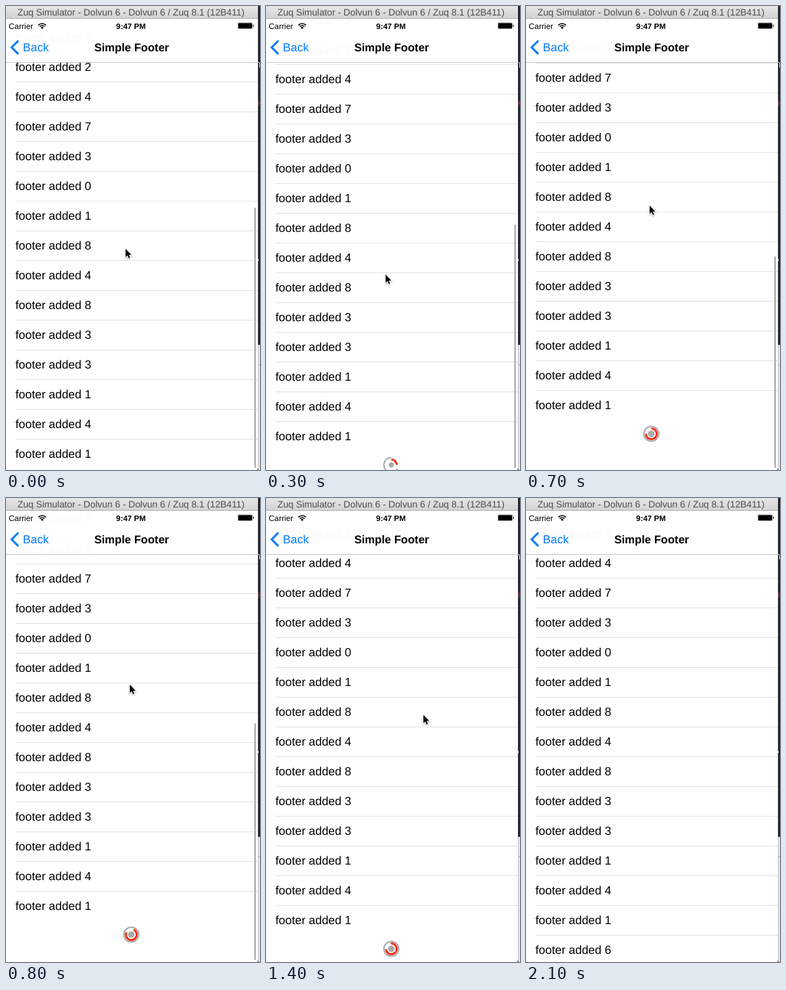
An HTML page with a canvas for the animation above (2.4 s loop, 376 by 686 pixels).

```html
<!DOCTYPE html>
<html lang="en">
<head>
<meta charset="utf-8">
<title>Simple Footer</title>
<style>
html, body { margin: 0; width: 100%; height: 100%; overflow: hidden; background: #fff; }
canvas { display: block; }
</style>
</head>
<body>
<canvas id="stage" width="376" height="686"></canvas>
<script>
const ctx = document.getElementById('stage').getContext('2d');
ctx.textRendering = 'geometricPrecision';
const SANS = '"Liberation Sans", Arial, sans-serif';
const W = 376, H = 686, EDGE = 373, ROW = 44, REST = 664;
const LOOP = 2400, STEP = 100, LAST_STEP = 21;
const ROWS = [3, 2, 4, 7, 3, 0, 1, 8, 4, 8, 3, 3, 1, 4, 1];
const BLUE = '#007aff', RED = '#f72c12', GRAY = '#a9a9a9', LINE = '#e2e2e2';

// keys: [step, value] pairs
const PULL = [[0, 2], [1, 0], [2, 3], [3, 28], [5, 50], [7, 74], [8, 61], [9, 45], [10, 40]];
const BAR_TOP = [[0, 298], [1, 296], [2, 299], [3, 323], [5, 346], [7, 370], [8, 333], [9, 317], [10, 311]];
const BAR_ALPHA = [[9, 1], [10, 0.65], [11, 0.25], [12, 0]];
const CURSOR_X = [[3, 177], [5, 179], [7, 183], [10, 184]];
const CURSOR_Y = [[0, 359], [1, 402], [2, 440], [3, 397], [5, 355], [7, 295], [8, 276], [10, 266]];

function at(keys, s) {
  if (s <= keys[0][0]) return keys[0][1];
  for (let i = 1; i < keys.length; i++) {
    const [s0, v0] = keys[i - 1], [s1, v1] = keys[i];
    if (s <= s1) return v0 + (v1 - v0) * (s - s0) / (s1 - s0);
  }
  return keys[keys.length - 1][1];
}

const clamp = v => Math.max(0, Math.min(1, v));

function rect(x, y, w, h, color) {
  ctx.fillStyle = color;
  ctx.fillRect(x, y, w, h);
}

function text(str, x, y, size, color, weight = 'normal', align = 'left') {
  ctx.font = `${weight} ${size}px ${SANS}`;
  ctx.textAlign = align;
  ctx.fillStyle = color;
  ctx.fillText(str, x, y);
}

function arc(x, y, r, from, to, width, color) {
  ctx.beginPath();
  ctx.arc(x, y, r, from * Math.PI / 180, to * Math.PI / 180);
  ctx.lineWidth = width;
  ctx.strokeStyle = color;
  ctx.stroke();
}

function dot(x, y, r, color) {
  ctx.beginPath();
  ctx.arc(x, y, r, 0, Math.PI * 2);
  ctx.fillStyle = color;
  ctx.fill();
}

function pill(x, y, w, h, r, color) {
  ctx.beginPath();
  ctx.roundRect(x, y, w, h, r);
  ctx.fillStyle = color;
  ctx.fill();
}

function rowLabel(value, y) {
  text('footer added ' + value, 14, y + 6, 17.4, '#000');
}

function drawRows(last, added) {
  const n = ROWS.length;
  ROWS.forEach((value, i) => {
    const y = last - (n - 1 - i) * ROW;
    rowLabel(value, y);
    if (i < n - 1) rect(14, y + 22, EDGE - 14, 1, LINE);
  });
  if (!added) return;
  ctx.globalAlpha = added;
  rect(14, last + 22, EDGE - 14, 1, LINE);
  rowLabel(6, last + ROW);
  ctx.globalAlpha = 1;
}

function drawSpinner(y, pull, s, alpha) {
  if (alpha <= 0 || pull < 4) return;
  const x = 185.5;
  const pulling = s < 7;
  const p = pulling ? clamp((pull - 17) / 33) : 1;
  const ring = pulling ? clamp(pull / 42) * 360 : 360;
  const turn = Math.max(0, s - 7.55) * 55;
  ctx.globalAlpha = alpha;
  arc(x, y, 11, -90 - ring, -90, 2, GRAY);
  dot(x, y, 3.2 + 1.6 * p, GRAY);
  if (p > 0) arc(x, y, 8, -90 + turn, -90 + turn + 270 * p, 3, RED);
  ctx.globalAlpha = 1;
}

function drawScrollBar(s) {
  const alpha = at(BAR_ALPHA, s);
  if (!alpha) return;
  const top = at(BAR_TOP, s);
  ctx.globalAlpha = alpha;
  pill(367.5, top, 2.5, 683 - top, 1.2, '#b0b0b0');
  ctx.globalAlpha = 1;
}

function drawStatus() {
  text('Carrier', 4, 33.5, 11.9, '#000');
  text('9:47 PM', 185, 33.5, 11.6, '#000', 'bold', 'center');
  for (const r of [8, 5]) arc(53.5, 34, r, -135, -45, 1.7, '#000');
  ctx.beginPath();
  ctx.moveTo(53.5, 34);
  ctx.arc(53.5, 34, 3, -Math.PI * 0.75, -Math.PI * 0.25);
  ctx.fillStyle = '#000';
  ctx.fill();
  pill(343, 24.5, 22, 9.5, 1.8, '#8c8c8c');
  pill(344, 25.5, 20, 7.5, 1, '#000');
  pill(365.5, 27.5, 1.5, 3.5, 0.7, '#444');
}

function drawHeader() {
  rect(0, 19, EDGE, 64, 'rgba(255,255,255,0.977)');
  rect(0, 83, EDGE, 1, '#c4c4c4');
  drawStatus();
  ctx.beginPath();
  ctx.moveTo(18.3, 51.3);
  ctx.lineTo(8.4, 61.2);
  ctx.lineTo(18.3, 71.1);
  ctx.lineWidth = 3;
  ctx.strokeStyle = BLUE;
  ctx.stroke();
  text('Back', 25, 67, 17.3, BLUE);
  text('Simple Footer', 186, 67, 16.6, '#000', 'bold', 'center');
}

function drawTitleBar() {
  const g = ctx.createLinearGradient(0, 0, 0, 19);
  g.addColorStop(0, '#e6e6e6');
  g.addColorStop(1, '#d2d2d2');
  rect(0, 0, EDGE, 19, g);
  rect(0, 18, EDGE, 1, '#b4b4b4');
  text('Zuq Simulator - Dolvun 6 - Dolvun 6 / Zuq 8.1 (12B411)', 185, 13.5, 13.75, '#4c4c4c', 'normal', 'center');
}

function drawBackdrop() {
  const x = EDGE, w = W - EDGE;
  rect(x, 0, w, 501, '#262626');
  rect(x, 501, w, H - 501, '#e8e8e8');
  rect(x, 530, w, 1, '#a8a8a8');
  rect(x, 501, 1, H - 501, '#bcbcbc');
  // slivers of the editor text behind the window
  rect(x, 83, 2, 1, '#e0e0e0');
  rect(x + 2, 84, 1, 7, '#e0e0e0');
  rect(x, 140, 2, 1, '#d8406f');
  rect(x, 143, 3, 1, '#d8406f');
  rect(x, 146, 2, 1, '#d8406f');
  rect(x, 374, 1, 3, '#d8d8d8');
  rect(EDGE - 1, H - 2, 2, 2, '#777');
}

function drawCursor(s) {
  if (s > 18) return;
  const u = clamp((s - 12) / 6);
  const glide = u * u * (3 - 2 * u);
  const x = at(CURSOR_X, s) + 189 * glide;
  const y = at(CURSOR_Y, s) + 211 * glide;
  const shape = [[0, 0], [0, 12.2], [2.8, 9.6], [4.7, 14], [6.7, 13.1], [4.8, 8.9], [8.6, 8.9]];
  ctx.save();
  ctx.translate(x, y);
  ctx.beginPath();
  shape.forEach(([px, py]) => ctx.lineTo(px, py));
  ctx.closePath();
  ctx.shadowColor = 'rgba(0,0,0,0.35)';
  ctx.shadowBlur = 2;
  ctx.shadowOffsetY = 1;
  ctx.lineWidth = 2;
  ctx.strokeStyle = '#fff';
  ctx.stroke();
  ctx.shadowColor = 'transparent';
  ctx.fillStyle = '#000';
  ctx.fill();
  ctx.restore();
}

function draw(ms) {
  const s = Math.min(LAST_STEP, Math.floor((ms % LOOP) / STEP));
  const pull = at(PULL, s);
  const last = Math.round(REST - pull);
  const added = clamp((s - 19) / 2);
  rect(0, 0, W, H, '#fff');
  drawRows(last, added);
  drawSpinner(last + 42.5, pull, s, 1 - added);
  drawScrollBar(s);
  drawHeader();
  drawTitleBar();
  drawBackdrop();
  drawCursor(s);
}

let start;
function tick(now) {
  if (start === undefined) start = now;
  draw(Math.max(0, now - start));
  requestAnimationFrame(tick);
}
draw(0);
requestAnimationFrame(tick);
</script>
</body>
</html>
```
